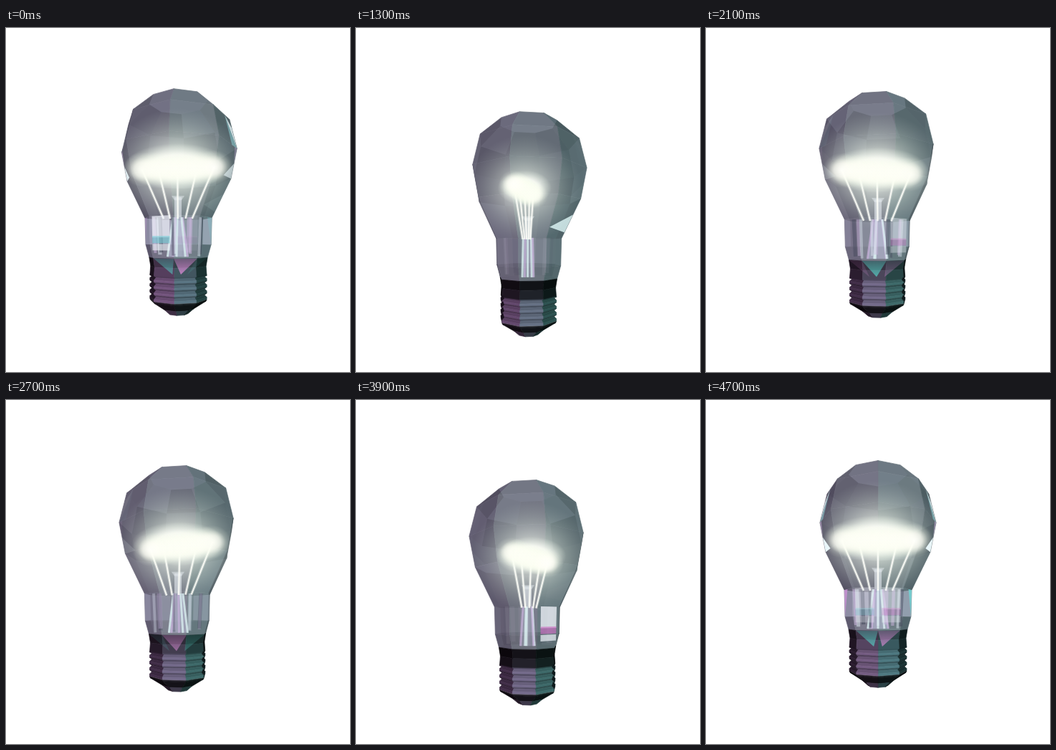
These frames come from a looping animation (480x480 px, 4.8 s). An HTML page with a canvas:

```html
<!DOCTYPE html>
<html lang="en">
<head>
<meta charset="utf-8">
<title>Light bulb</title>
<style>
html, body { margin: 0; width: 100%; height: 100%; overflow: hidden; background: #fff; }
canvas { display: block; width: 480px; height: 480px; }
</style>
</head>
<body>
<canvas id="stage" width="480" height="480"></canvas>
<script>
const ctx = document.getElementById('stage').getContext('2d');
const LOOP = 4800, STEP = 100, SIDES = 8;
const CX = 240, HORIZON = 300, DEPTH = 450;
const RAD = Math.PI / 180;

// Profiles: [radius, height]
const GLASS = [[41, 104], [71, 131], [81, 171], [73, 212], [47, 265], [46, 302], [41, 320]];
const THREAD = [[40, 344]];
for (let i = 0; i < 4; i++) THREAD.push([37, 346 + i * 8.5], [40, 349 + i * 8.5], [40, 352 + i * 8.5]);
const TIP = [[40, 378], [39, 380], [22, 391], [14, 398]];

// Colour stops by viewing angle: [degrees, r, g, b]
const GLASS_TINT = [[-90, 72, 70, 86], [-45, 96, 91, 110], [-10, 112, 114, 127],
  [20, 103, 117, 123], [50, 84, 105, 109], [90, 60, 72, 77]];
const METAL_TINT = [[-90, 18, 12, 20], [-58, 52, 35, 58], [-30, 112, 82, 122], [-7, 112, 104, 134],
  [8, 98, 109, 128], [22, 76, 117, 125], [45, 52, 95, 92], [70, 24, 44, 46], [90, 10, 18, 20]];
const NECK_LIT = [1, 0, 0, 0, 0.45, 0, 0, 0.9];

let rot = 0, lift = 0, drop = 0;

const clamp = (v, a, b) => Math.min(b, Math.max(a, v));
const wrap = a => ((a + 180) % 360 + 360) % 360 - 180;
const bell = (v, mid, spread) => Math.exp(-Math.pow((v - mid) / spread, 2));
const rgb = (c, k = 1) => `rgb(${c.map(v => clamp(v * k, 0, 255) | 0)})`;
const hash = n => { const s = Math.sin(n * 127.1 + 11.7) * 43758.5453; return s - Math.floor(s); };
const mix = (p, q, k) => [p[0] + (q[0] - p[0]) * k, p[1] + (q[1] - p[1]) * k];

function tint(stops, a) {
  a = clamp(a, -90, 90);
  let i = 1;
  while (i < stops.length - 1 && stops[i][0] < a) i++;
  const p = stops[i - 1], q = stops[i], k = (a - p[0]) / (q[0] - p[0]);
  return [1, 2, 3].map(n => p[n] + (q[n] - p[n]) * k);
}

function project(x, y, z) {
  const s = DEPTH / (DEPTH - z);
  return [CX + x * s, HORIZON + (y + drop - HORIZON) * s];
}
function turned(x, y, z) {
  const c = Math.cos(rot * RAD), s = Math.sin(rot * RAD);
  return project(x * c - z * s, y, x * s + z * c);
}
const onRing = (a, [r, y]) => project(r * Math.sin(a * RAD), y, r * Math.cos(a * RAD));

function poly(pts, fill, seam) {
  ctx.beginPath();
  pts.forEach(p => ctx.lineTo(p[0], p[1]));
  ctx.closePath();
  ctx.fillStyle = fill;
  ctx.fill();
  if (seam) {
    ctx.strokeStyle = fill;
    ctx.lineWidth = 0.7;
    ctx.stroke();
  }
}

function faces(profile) {
  const list = [];
  for (let row = 0; row < profile.length - 1; row++) {
    for (let i = 0; i < SIDES; i++) {
      const a = wrap((i + 0.5) * 45 - rot);
      const p = [onRing(a - 22.5, profile[row]), onRing(a + 22.5, profile[row]),
        onRing(a + 22.5, profile[row + 1]), onRing(a - 22.5, profile[row + 1])];
      let area = 0;
      p.forEach((u, k) => { const v = p[(k + 1) % 4]; area += u[0] * v[1] - v[0] * u[1]; });
      list.push({ row, i, a, p, front: area > 0 });
    }
  }
  return list;
}

function glow(x, y, rx, ry, stops) {
  ctx.save();
  ctx.translate(x, y);
  ctx.scale(rx, ry);
  const g = ctx.createRadialGradient(0, 0, 0, 0, 0, 1);
  stops.forEach(([at, c]) => g.addColorStop(at, c));
  ctx.fillStyle = g;
  ctx.fillRect(-1, -1, 2, 2);
  ctx.restore();
}

function line(p, q, color, width) {
  ctx.strokeStyle = color;
  ctx.lineWidth = width;
  ctx.beginPath();
  ctx.moveTo(p[0], p[1]);
  ctx.lineTo(q[0], q[1]);
  ctx.stroke();
}

function drawGlass(list) {
  const bright = [0.94, 0.98, 1, 1.06, 1.04 + 0.14 * lift, 1 + 0.18 * lift];
  for (const f of list) {
    if (!f.front) continue;
    const k = bright[f.row] * (0.96 + 0.08 * hash(f.row * 8 + f.i));
    poly(f.p, rgb(tint(GLASS_TINT, f.a), k), true);
  }
  ctx.globalCompositeOperation = 'source-atop';
  const cap = [];
  for (let i = 0; i < SIDES; i++) cap.push(onRing(i * 45 - rot, GLASS[0]));
  poly(cap, 'rgba(160,165,190,0.2)');
  for (const f of list) {
    if (f.front) continue;
    const h = hash(f.row * 17 + f.i * 3 + 5);
    if (f.row === 4) poly(f.p, `rgba(212,216,242,${h * (0.12 + 0.4 * lift)})`);
    else poly(f.p, h > 0.5 ? `rgba(165,170,190,${(h - 0.4) * 0.22})` : `rgba(35,38,52,${(0.6 - h) * 0.22})`);
  }
}

function drawStem(wide) {
  const foot = project(0, 319, 0)[1], neck = project(0, 264, 0)[1], head = project(0, 236, 0)[1];
  const flare = 6 + 9 * wide;
  poly([[CX - 7, neck], [CX + 7, neck], [CX + flare, foot], [CX - flare, foot]],
    `rgba(195,198,226,${0.3 + 0.25 * lift})`);
  poly([[CX - 5, head], [CX + 5, head], [CX + 5, neck], [CX - 5, neck]], 'rgba(228,234,240,0.6)');
  poly([[CX - 9, head - 2], [CX + 9, head - 2], [CX + 5, head + 4], [CX - 5, head + 4]], 'rgba(230,235,240,0.5)');
  for (let i = 0; i < 5; i++) {
    const x = Math.sin((i * 72 - rot) * RAD);
    line([CX + x * 7, neck], [CX + x * flare, foot],
      i % 2 ? 'rgba(205,180,222,0.65)' : 'rgba(222,244,244,0.75)', 3);
  }
  // Reflections running down the neck
  const streaks = ['225,235,245', '205,180,222', '60,66,84'];
  for (let i = 0; i < 9; i++) {
    const x = Math.sin((i * 40 - rot) * RAD) * 34;
    line([CX + x, neck], [CX + x * 0.93, foot - 6 * hash(i)],
      `rgba(${streaks[i % 3]},${0.08 + 0.42 * lift})`, 3 + 3 * hash(i + 20));
  }
}

function drawInside() {
  const wide = Math.abs(Math.cos(rot * RAD));
  const at = u => turned(50 * u, 197, 5);
  const mid = at(0), span = Math.abs(at(1)[0] - at(-1)[0]) / 2;

  glow(mid[0], mid[1] - 2, 76 + 16 * wide, 72 + 10 * wide, [
    [0, `rgba(246,250,240,${0.72 + 0.2 * wide})`], [0.35, `rgba(226,234,224,${0.5 + 0.2 * wide})`],
    [0.65, `rgba(196,208,200,${0.26 + 0.12 * wide})`], [1, 'rgba(165,175,175,0)']]);

  drawStem(wide);

  for (const u of [-1, -0.54, 0, 0.54, 1]) {
    const top = at(u), low = turned(20 * u, 266, 2);
    line(top, low, 'rgba(240,246,240,0.4)', 4);
    line(top, low, 'rgba(255,255,250,0.9)', 1.8);
  }

  glow(mid[0], mid[1] - 3, span + 24, 22 + 10 * wide, [
    [0, 'rgba(255,255,252,1)'], [0.5, 'rgba(255,255,250,0.85)'],
    [0.8, 'rgba(248,255,244,0.3)'], [1, 'rgba(240,250,236,0)']]);
  const size = 19 + 8 * wide;
  for (let u = -1; u <= 1.01; u += 0.25) {
    const p = at(u);
    glow(p[0], p[1], size, size * 0.9, [
      [0, 'rgba(255,255,250,0.95)'], [0.4, 'rgba(255,255,246,0.7)'],
      [0.7, 'rgba(250,255,240,0.22)'], [1, 'rgba(240,250,232,0)']]);
  }
}

function drawGlints(list) {
  for (const f of list) {
    if (!f.front) continue;
    const [a, b, c, d] = f.p;
    const left = f.a < 0, turn = Math.abs(f.a);
    const inner = left ? [b, c] : [a, d];
    const outer = left ? [a, d] : [b, c];
    if (f.row === 1) {
      const k = bell(turn, 64, 8) * (0.15 + 0.85 * lift);
      const tip = mix(outer[0], inner[0], 0.3);
      poly([tip, outer[1], mix(outer[0], outer[1], 0.3)], `rgba(238,252,255,${k})`);
      poly([tip, mix(outer[1], inner[1], 0.28), outer[1]], `rgba(150,225,228,${k * 0.6})`);
    }
    if (f.row === 2) {
      const k = bell(turn, 70, 14) * (0.15 + 0.85 * lift);
      const e = mix(outer[0], outer[1], 0.5);
      poly([e, outer[1], mix(inner[1], outer[1], 0.55)], `rgba(238,252,255,${k})`);
      poly([e, mix(outer[0], inner[0], 0.12), outer[0]], `rgba(205,175,220,${k * 0.6})`);
    }
    if (f.row === 3) {
      const k = bell(f.a, 52, 7) * (1 - 0.6 * lift);
      const e = mix(outer[0], outer[1], 0.4);
      poly([e, mix(inner[0], inner[1], 0.75), mix(outer[0], outer[1], 0.85)], `rgba(225,250,250,${k * 0.8})`);
    }
    if (f.row === 4) {
      const k = NECK_LIT[f.i] * bell(turn, 35, 13);
      const top = mix(outer[0], inner[0], 0.1), topIn = mix(outer[0], inner[0], 0.85);
      const low = mix(outer[1], inner[1], 0.1), lowIn = mix(outer[1], inner[1], 0.85);
      const band = (s, e, color, alpha) => poly([mix(top, low, s), mix(topIn, lowIn, s),
        mix(topIn, lowIn, e), mix(top, low, e)], `rgba(${color},${alpha * k})`);
      band(0, 0.75, '245,248,255', 0.85);
      band(0.7, 0.95, left ? '115,205,215' : '205,110,195', 0.75);
      band(0.98, 1.2, '240,246,252', 0.8);
      const side = bell(turn, 68, 7) * (0.2 + 0.6 * lift);
      poly([outer[0], mix(outer[0], inner[0], 0.4), outer[1]],
        left ? `rgba(205,145,215,${side})` : `rgba(110,215,215,${side})`);
    }
  }
}

function drawBase() {
  ctx.globalCompositeOperation = 'source-over';
  const collar = faces([[41, 320], [39, 332], [40, 345]]).filter(f => f.front);
  for (const f of collar) {
    poly(f.p, rgb(tint(METAL_TINT, f.a), f.row ? 0.32 + 0.45 * lift : 0.18 + 0.4 * lift), true);
  }
  for (const f of collar) {
    const k = lift * Math.max(0, 1 - Math.abs(f.a) / 70);
    if (f.row || k < 0.05) continue;
    const tip = [CX + (f.p[2][0] + f.p[3][0] - 2 * CX) * 0.2, project(0, 340, 39)[1]];
    const g = ctx.createLinearGradient(0, f.p[0][1], 0, tip[1]);
    const color = f.i % 2 ? '85,212,200' : '222,140,216';
    g.addColorStop(0, `rgba(${color},${k * 0.45})`);
    g.addColorStop(1, `rgba(${color},${k})`);
    poly([f.p[0], f.p[1], tip], g);
  }
  const relief = [0.72, 0.92, 1.04];
  for (const f of faces(THREAD)) {
    if (f.front) poly(f.p, rgb(tint(METAL_TINT, f.a), relief[f.row % 3]), true);
  }
  for (const f of faces(TIP)) {
    if (f.front) poly(f.p, rgb(tint(METAL_TINT, f.a), [0.3, 0.18, 0.55][f.row]), true);
  }
}

function draw(t) {
  rot = (t - 4700) * 360 / LOOP;
  const bob = Math.cos((t - 2350) / 2400 * Math.PI * 2);
  drop = 15 - 15 * bob;
  lift = clamp(bob, 0, 1);
  ctx.globalCompositeOperation = 'source-over';
  ctx.clearRect(0, 0, 480, 480);
  const glass = faces(GLASS);
  drawGlass(glass);
  drawInside();
  drawGlints(glass);
  drawBase();
}

const start = performance.now();
function tick() {
  const t = (performance.now() - start) % LOOP;
  draw(Math.floor(t / STEP) * STEP);
  requestAnimationFrame(tick);
}
tick();
</script>
</body>
</html>
```
